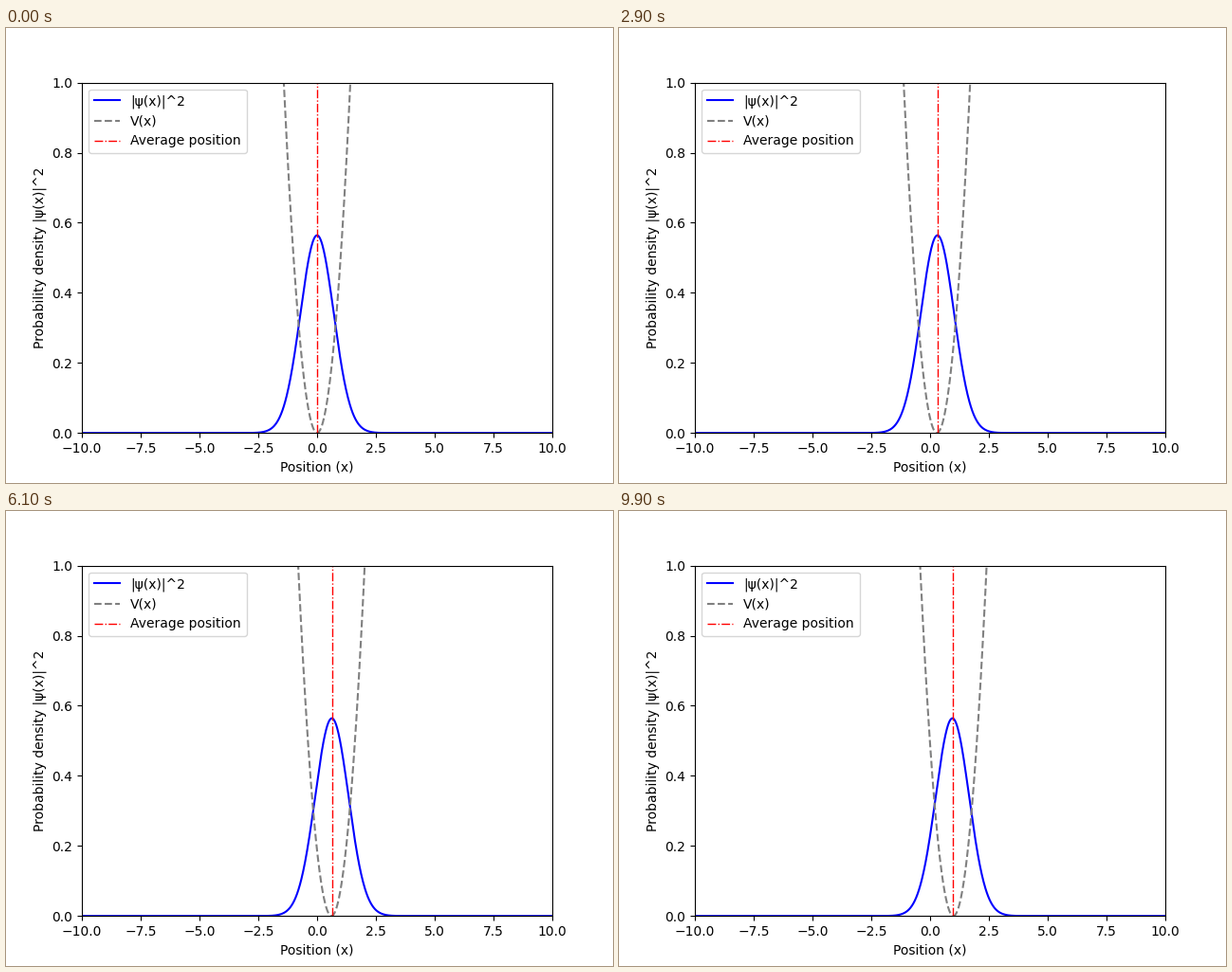
These frames come from a looping animation (640 by 480 pixels, 10000 ms). A matplotlib script:

```python
import numpy as np
import matplotlib.pyplot as plt
from matplotlib.animation import FuncAnimation

FRAMES = 100
DT = 0.2        # simulated time per frame
SPEED = 0.05    # drift of the trap centre

x = np.linspace(-10, 10, 1000)


def potential(center):
    return 0.5 * (x - center) ** 2


def density(mean):
    return np.exp(-(x - mean) ** 2) / np.sqrt(np.pi)


fig, ax = plt.subplots(figsize=(6.4, 4.8), dpi=100)
psi_line, = ax.plot(x, density(0), color="blue", label="|ψ(x)|^2")
v_line, = ax.plot(x, potential(0), color="gray", ls="--", label="V(x)")
mean_line = ax.axvline(0, color="red", ls="-.", lw=1, label="Average position")
ax.set_xlim(-10, 10)
ax.set_ylim(0, 1)
ax.set_xlabel("Position (x)")
ax.set_ylabel("Probability density |ψ(x)|^2")
ax.legend(loc="upper left")


def update(i):
    # A packet at rest in a trap that starts moving lags and sloshes around it
    t = i * DT
    center = SPEED * t
    mean = SPEED * (t - np.sin(t))
    psi_line.set_ydata(density(mean))
    v_line.set_ydata(potential(center))
    mean_line.set_xdata([mean, mean])
    return psi_line, v_line, mean_line


ani = FuncAnimation(fig, update, frames=FRAMES, interval=100, repeat=True)
plt.show()
```
